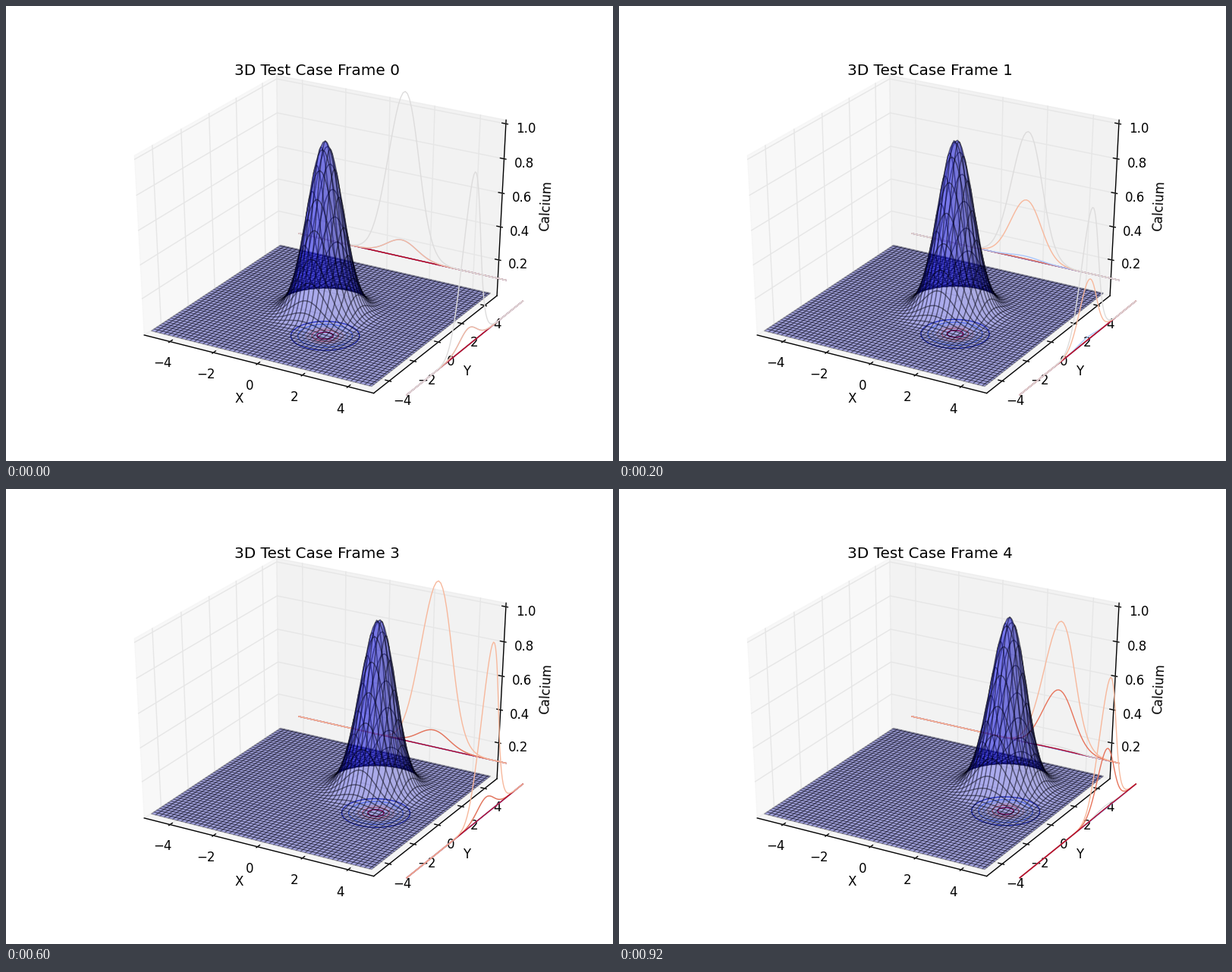
Write a matplotlib script that moves like this. It is 800 px wide and 600 px high and loops after 1000 ms.

```python
import numpy as np
import matplotlib.pyplot as plt
from matplotlib.animation import FuncAnimation
from matplotlib.collections import LineCollection, PolyCollection
from matplotlib.patches import Polygon

plt.rcParams.update({"font.family": "DejaVu Sans", "font.size": 12,
                     "lines.linewidth": 1.0, "patch.linewidth": 1.0})

FRAMES, INTERVAL = 5, 200
LOW, HIGH, COUNT, STRIDE = -5.0, 4.9, 100, 2
ALPHA = 0.3
WALL = 0.5 + 1 / 48      # half size of the drawn box, in unit-cube coordinates
OFFSET = 0.65            # projection planes lie 15 % outside the data
DELTA = 1 / 12           # basis for tick and label distances

# Camera at elevation 30, azimuth -60, distance 10
S3 = np.sqrt(3)
NORMAL = np.array([S3 / 4, -0.75, 0.5])
RIGHT = np.array([S3 / 2, 0.5, 0])
UP = np.cross(NORMAL, RIGHT)


def project(points):
    """Map unit-cube points, centred on the origin, to pixels."""
    points = np.asarray(points, float)
    w = 10 - points @ NORMAL
    px = 100 + (points @ RIGHT / w + 0.095) / 0.185 * 620
    py = 540 - (points @ UP / w + 0.095) / 0.185 * 480
    return np.stack([px, py], axis=-1)


def unit(value):
    return (value - LOW) / (HIGH - LOW) - 0.5


def coolwarm(values):
    return plt.cm.coolwarm(np.linspace(0, 1, len(values)))


fig = plt.figure(figsize=(8, 6), dpi=100, facecolor="white")
ax = fig.add_axes([0, 0, 1, 1])
ax.set(xlim=(0, 800), ylim=(600, 0))
ax.axis("off")


def draw_line(points, color, zorder):
    ax.plot(*project(points).T, color=color, lw=1, zorder=zorder)


def draw_panes():
    sides = [(-1, -1), (1, -1), (1, 1), (-1, 1)]
    for axis, side, grey in ((0, -1, 0.95), (1, 1, 0.90), (2, -1, 0.925)):
        corners = np.insert(np.array(sides, float), axis, side, axis=1) * WALL
        color = (grey, grey, grey, 0.5)
        ax.add_patch(Polygon(project(corners), fc=color, ec=color, zorder=0))


def draw_axis(axis, edge, tick_dir, ticks, labels, name, grid):
    """edge holds the signs of the box edge; its own axis entry is 0."""
    edge = np.array(edge, float)
    ends = np.array([edge, edge]) * WALL
    ends[:, axis] = -WALL, WALL
    draw_line(ends, "k", 1)

    for tick, label in zip(ticks, labels):
        path = np.array(grid, float) * WALL
        path[:, axis] = tick
        draw_line(path, (0.9, 0.9, 0.9), 1)

        base = edge * WALL
        base[axis] = tick
        mark = np.array([base, base])
        mark[:, tick_dir] += edge[tick_dir] * DELTA * np.array([0.1, -0.2])
        draw_line(mark, "k", 1.5)
        ax.text(*project(base + edge * 0.7 * DELTA), label,
                ha="center", va="top", zorder=2)

    (x0, y0), (x1, y1) = project(ends)
    angle = np.degrees(np.arctan2(y0 - y1, x1 - x0)) if len(name) > 4 else 0
    ax.text(*project(edge * (WALL + 1.6 * DELTA)), name, rotation=angle,
            ha="center", va="center", zorder=2)


draw_panes()
ground = np.arange(-4, 5, 2)
ground_labels = [f"{v}".replace("-", "\u2212") for v in ground]
heights = np.arange(1, 6) / 5
draw_axis(0, (0, -1, -1), 1, unit(ground), ground_labels, "X",
          [(0, -1, -1), (0, 1, -1), (0, 1, 1)])
draw_axis(1, (1, 0, -1), 0, unit(ground), ground_labels, "Y",
          [(1, 0, -1), (-1, 0, -1), (-1, 0, 1)])
draw_axis(2, (1, 1, 0), 0, heights - 0.5, [f"{v:.1f}" for v in heights],
          "Calcium", [(-1, -1, 0), (-1, 1, 0), (1, 1, 0)])

title = ax.text(410, 91.4, "", fontsize=14.4, ha="center", va="baseline")

axis_values = np.linspace(LOW, HIGH, COUNT)
X, Y = np.meshgrid(axis_values, axis_values)
side_levels = np.arange(-4.5, 5, 1.5)
ring_levels = np.arange(0.15, 0.95, 0.15)


def cell_outlines():
    """Flat grid indices around each mesh cell, counter-clockwise."""
    index = np.arange(COUNT * COUNT).reshape(COUNT, COUNT)
    cells = []
    for r in range(0, COUNT - 1, STRIDE):
        for c in range(0, COUNT - 1, STRIDE):
            r2, c2 = min(r + STRIDE, COUNT - 1), min(c + STRIDE, COUNT - 1)
            cells.append(np.concatenate([
                index[r, c:c2 + 1], index[r + 1:r2 + 1, c2],
                index[r2, c:c2 + 1][::-1], index[r:r2, c][::-1]]))
    return cells


CELLS = cell_outlines()
TRIPLES = np.array([[cell[len(cell) * i // 3] for i in range(3)]
                    for cell in CELLS])

back_lines = LineCollection([], linewidths=1, zorder=4)
rings = LineCollection([], linewidths=1, zorder=5,
                       colors=coolwarm(ring_levels))
surface = PolyCollection([], linewidths=1, zorder=6,
                         edgecolors=(0, 0, 0, ALPHA))
side_lines = LineCollection([], linewidths=1, zorder=7)
for collection in (back_lines, rings, surface, side_lines):
    ax.add_collection(collection, autolim=False)


def update_surface(centre):
    z = np.exp(-(X - centre) ** 2 - (Y - centre) ** 2)
    points = np.stack([X, Y, z], axis=-1).reshape(-1, 3)
    cube = np.column_stack([unit(points[:, :2]), points[:, 2] - 0.5])
    pixels = project(cube)
    depth = -10 / (10 - cube @ NORMAL)

    a, b, c = (points[TRIPLES[:, i]] for i in range(3))
    normals = np.cross(a - b, b - c)
    normals /= np.linalg.norm(normals, axis=1, keepdims=True)
    shade = normals @ [-1, -1, 0.5]
    shade = 0.5 + 0.5 * (shade - shade.min()) / np.ptp(shade)
    colors = np.outer(shade, [0, 0, 1, 0])
    colors[:, 3] = ALPHA

    far_first = np.argsort([-depth[cell].mean() for cell in CELLS],
                           kind="stable")
    surface.set_verts([pixels[CELLS[i]] for i in far_first])
    surface.set_facecolor(colors[far_first])


def update_profiles(collection, axis, centre):
    """Slices through the bump, seen along the other ground axis."""
    q = unit(axis_values)
    near_end = 0.5 if NORMAL[axis] > 0 else -0.5
    items = []
    for level, color in zip(side_levels, coolwarm(side_levels)):
        z = np.exp(-(axis_values - centre) ** 2 - (level - centre) ** 2)
        points = np.full((COUNT, 3), OFFSET)
        points[:, axis] = q
        points[:, 2] = z - 0.5
        nearness = np.max(NORMAL[axis] * (q - near_end) + 0.5 * z)
        items.append((round(nearness, 14), project(points), color))
    items.sort(key=lambda item: item[0])
    collection.set_segments([item[1] for item in items])
    collection.set_color([item[2] for item in items])


def update_rings(centre):
    t = np.linspace(0, 2 * np.pi, 90)
    paths = []
    for level in ring_levels:
        radius = np.sqrt(-np.log(level))
        paths.append(project(np.column_stack([
            unit(centre + radius * np.cos(t)),
            unit(centre + radius * np.sin(t)),
            np.full_like(t, -OFFSET)])))
    rings.set_segments(paths)


def update(frame):
    centre = 0.5 * frame
    title.set_text(f"3D Test Case Frame {frame}")
    update_surface(centre)
    update_profiles(back_lines, 0, centre)
    update_profiles(side_lines, 1, centre)
    update_rings(centre)
    return title, back_lines, rings, surface, side_lines


animation = FuncAnimation(fig, update, frames=FRAMES, init_func=lambda: [],
                          interval=INTERVAL, repeat=True, repeat_delay=0,
                          blit=False)
plt.show()
```
